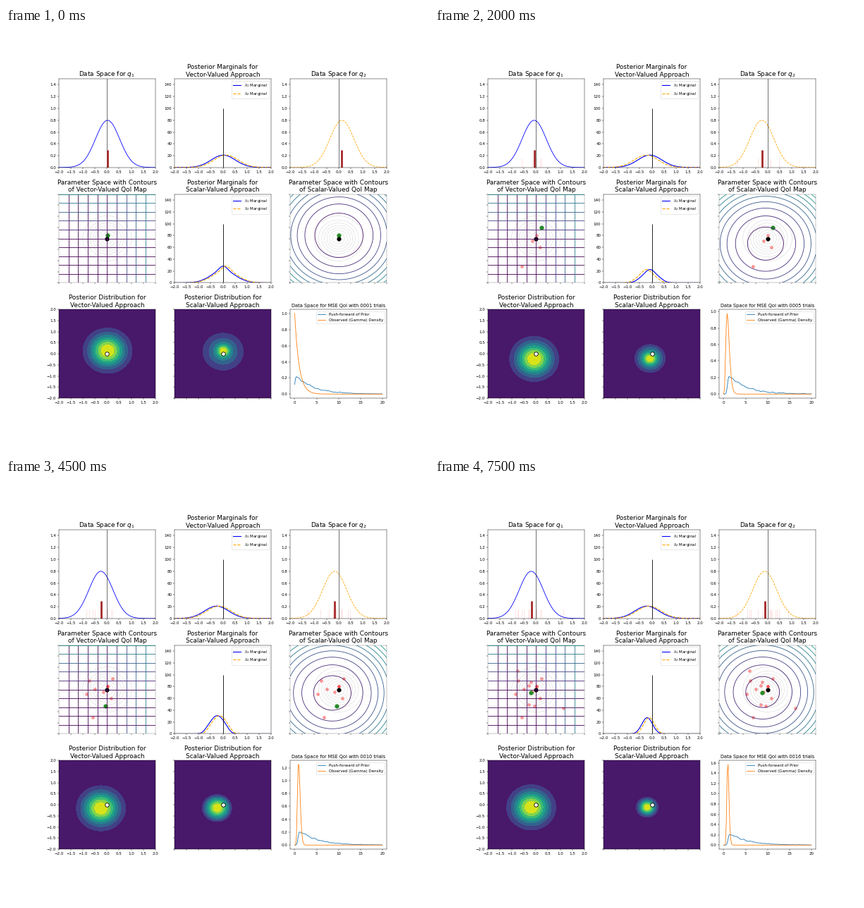
Recreate the animation shown at these times as a matplotlib script. Size 600 px wide and 600 px high, loop 8000 ms.

```python
import math

import numpy as np
import matplotlib.pyplot as plt
from matplotlib.animation import FuncAnimation

SIGMA = 0.5
TRIALS = 16
SCALE = 26.2  # height of the marginals per unit of density

# observed data, one (q1, q2) pair per trial
DATA = np.array([
    (0.02, 0.14), (-0.17, -0.10), (-0.61, -1.27), (0.15, -0.41),
    (0.21, 0.48), (0.01, 0.13), (-0.73, 0.40), (-0.87, -0.22),
    (-0.50, 0.03), (-0.07, -0.76), (-0.76, 0.85), (-0.29, 0.18),
    (-0.29, -0.68), (-0.23, 0.34), (1.14, -0.83), (-0.23, -0.13),
])

rng = np.random.default_rng(7)
PRIOR = rng.normal(size=(5000, 2))

axis = np.linspace(-2, 2, 121)
STEP = axis[1] - axis[0]
X, Y = np.meshgrid(axis, axis)
prior_pdf = np.exp(-(X**2 + Y**2) / 2) / (2 * np.pi)
q_plot = np.linspace(0, 20, 100)
q_fine = np.linspace(0, 20, 401)


def normal(x, mean):
    z = (x - mean) / SIGMA
    return np.exp(-z**2 / 2) / (SIGMA * math.sqrt(2 * np.pi))


def mse(x, y, data):
    mx, my = data.mean(axis=0)
    return (x - mx)**2 + (y - my)**2 + data.var(axis=0).sum()


def gamma_pdf(x, n):
    return n * (n * x)**(n - 1) * np.exp(-n * x) / math.factorial(n - 1)


def kde(x, samples, width=0.2):
    z = (x[:, None] - samples[None, :]) / width
    return np.exp(-z**2 / 2).mean(axis=1) / (width * math.sqrt(2 * np.pi))


plt.rcParams["font.family"] = "DejaVu Sans"
fig, axes = plt.subplots(3, 3, figsize=(15, 15), dpi=40)
fig.subplots_adjust(left=0.125, right=0.9, bottom=0.125, top=0.88,
                    wspace=0.2, hspace=0.3)
halves = np.arange(-2, 2.1, 0.5)


def setup(ax, title, ylim, yticks):
    ax.set_title(title, fontsize=16)
    ax.set(xlim=(-2, 2), ylim=ylim, xticks=halves, yticks=yticks)


def data_panel(ax, k, color, style):
    setup(ax, f"Data Space for $q_{k}$", (0, 1.5), np.arange(0, 1.5, 0.2))
    line, = ax.plot([], [], color=color, ls=style, lw=1.5)
    ax.axvline(0, color="k", lw=1)
    return line


def marginal_panel(ax, kind):
    setup(ax, f"Posterior Marginals for\n{kind}-Valued Approach",
          (0, 150), np.arange(0, 150, 20))
    first, = ax.plot([], [], color="blue", lw=2, label=r"$\lambda_1$ Marginal")
    second, = ax.plot([], [], color="orange", ls="--", lw=2,
                      label=r"$\lambda_2$ Marginal")
    ax.vlines(0, 0, 100, color="k", lw=1.5)
    ax.legend(loc="upper right", fontsize=10)
    return first, second


def map_panel(ax, kind):
    setup(ax, f"Parameter Space with Contours\nof {kind}-Valued QoI Map",
          (-2, 2), halves)
    ax.tick_params(labelbottom=False, labelleft=False)
    for spine in ax.spines.values():
        spine.set_linewidth(0.4)
    ax.contour(X, Y, normal(X, 0) * normal(Y, 0), colors="gray", alpha=0.3,
               levels=np.arange(0.08, 0.6, 0.08), linewidths=1)


def posterior_panel(ax, kind, labels):
    setup(ax, f"Posterior Distribution for\n{kind}-Valued Approach",
          (-2, 2), halves)
    ax.tick_params(labelbottom=labels, labelleft=labels)


lines_q = [data_panel(axes[0, 0], 1, "blue", "-"),
           data_panel(axes[0, 2], 2, "orange", "--")]
lines_vector = marginal_panel(axes[0, 1], "Vector")
lines_scalar = marginal_panel(axes[1, 1], "Scalar")
map_panel(axes[1, 0], "Vector")
map_panel(axes[1, 2], "Scalar")
posterior_panel(axes[2, 0], "Vector", True)
posterior_panel(axes[2, 1], "Scalar", False)

for level in np.arange(-1.6, 2.1, 0.4):
    shade = plt.cm.viridis(max(level, 0) / 4)
    axes[1, 0].axvline(level, color=shade, lw=1.5)
    axes[1, 0].axhline(level, color=shade, lw=1.5)

ax_mse = axes[2, 2]
line_push, = ax_mse.plot([], [], lw=1.5, label="Push-forward of Prior")
line_obs, = ax_mse.plot([], [], lw=1.5, label="Observed (Gamma) Density")
ax_mse.set(xlim=(-1, 21), xticks=[0, 5, 10, 15, 20])
ax_mse.legend(loc="upper right", fontsize=10)

moving = []


def draw_posterior(ax, density):
    levels = np.linspace(0, density.max() * 1.0001, 9)
    moving.append(ax.contourf(X, Y, density, levels=levels, cmap="viridis"))
    moving.append(ax.scatter(0, 0, s=100, color="white", edgecolor="k",
                             lw=1.5, zorder=1.5))


def update(i):
    while moving:
        moving.pop().remove()
    n = i + 1
    data = DATA[:n]
    mean = data.mean(axis=0)

    # data spaces
    for k, ax in enumerate((axes[0, 0], axes[0, 2])):
        curve = normal(axis, mean[k])
        lines_q[k].set_data(axis, curve)
        lines_vector[k].set_data(axis, SCALE * curve)
        moving.append(ax.vlines(data[:, k], 0, 0.15, color="red",
                                alpha=0.2, lw=1))
        moving.append(ax.vlines(mean[k], 0, 0.3, color="brown", lw=5))

    # parameter spaces
    for ax in (axes[1, 0], axes[1, 2]):
        moving.append(ax.scatter(*data.T, s=50, color="red", alpha=0.4))
        moving.append(ax.scatter(*data[-1], s=100, color="forestgreen"))
        moving.append(ax.scatter(0, 0, s=100, color="black"))
    error = mse(X, Y, data)
    moving.append(axes[1, 2].contour(X, Y, error, levels=np.arange(1, 16),
                                     cmap="viridis", vmin=0, vmax=16,
                                     linewidths=1.5))

    # error measure and the two posteriors
    unit = 2 * SIGMA**2
    samples = mse(*PRIOR.T, data) / unit
    push, obs = kde(q_plot, samples), gamma_pdf(q_plot, n)
    line_push.set_data(q_plot, push)
    line_obs.set_data(q_plot, obs)
    top = obs.max()
    ax_mse.set_ylim(-0.05 * top, 1.05 * top)
    ax_mse.set_title(f"Data Space for MSE QoI with {n:04d} trials",
                     fontsize=12)

    q = error / unit
    push_q = np.interp(q, q_fine, np.maximum(kde(q_fine, samples), 1e-4))
    scalar = prior_pdf * gamma_pdf(q, n) / push_q
    lines_scalar[0].set_data(axis, SCALE * STEP * scalar.sum(axis=0))
    lines_scalar[1].set_data(axis, SCALE * STEP * scalar.sum(axis=1))
    draw_posterior(axes[2, 0], normal(X, mean[0]) * normal(Y, mean[1]))
    draw_posterior(axes[2, 1], scalar)
    return []


anim = FuncAnimation(fig, update, frames=TRIALS, interval=500,
                     init_func=lambda: [], repeat=True, repeat_delay=0)
plt.show()
```
